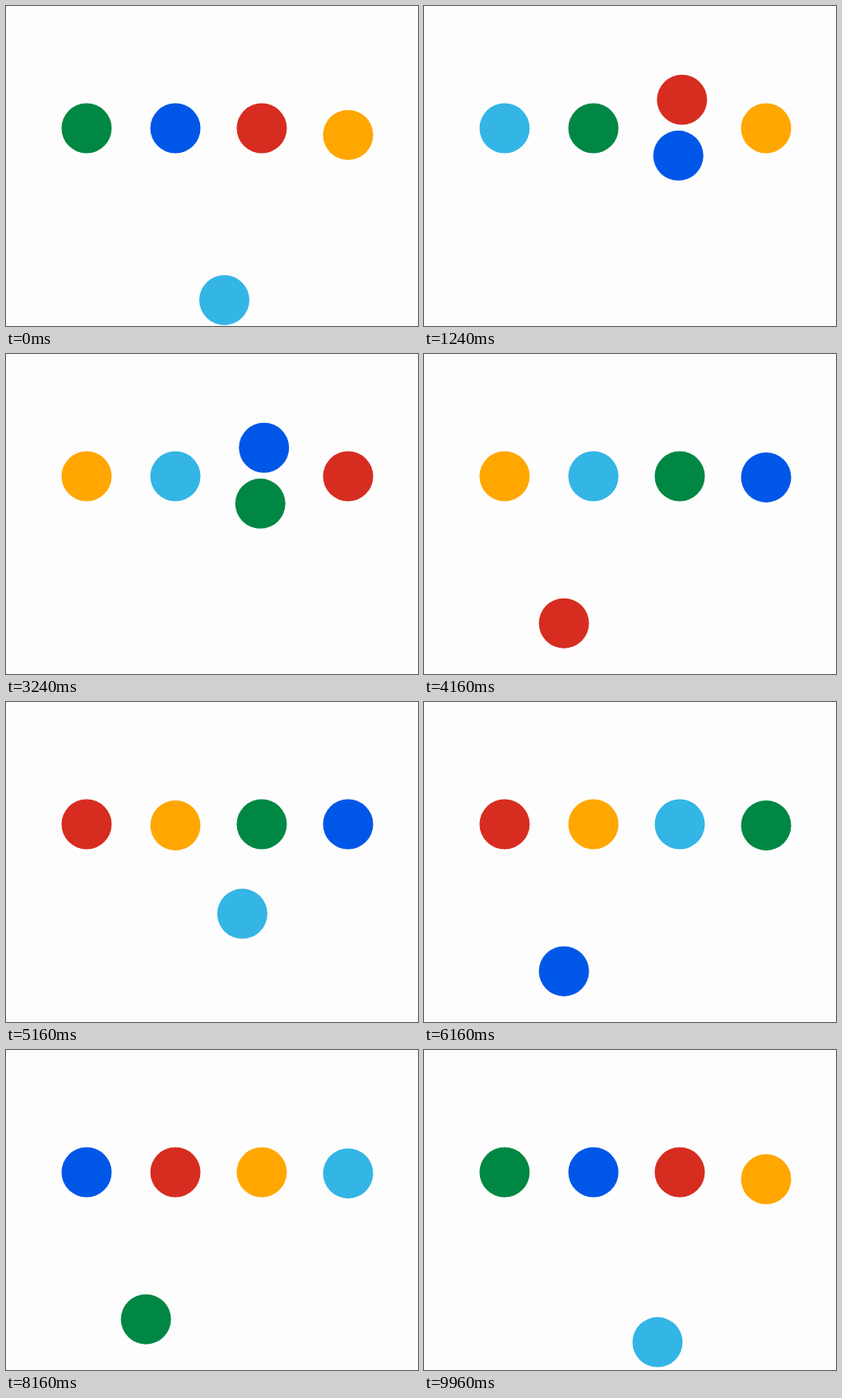
Write an HTML page with a canvas that moves like this. It is 501x390 px and loops after 10 s.

```html
<!DOCTYPE html>
<html lang="en">
<head>
<meta charset="utf-8">
<title>Bouncing balls</title>
<style>
  html, body { margin: 0; width: 100%; height: 100%; overflow: hidden; background: #fdfdfd; }
  canvas { display: block; }
</style>
</head>
<body>
<canvas id="stage" width="501" height="390"></canvas>
<script>
const ctx = document.getElementById('stage').getContext('2d');
const LOOP = 10000, STEP = 40, RADIUS = 30.5, BASE_Y = 149;
const COLORS = ['#008744', '#0057e7', '#d62d20', '#ffa700', '#33b5e5'];

const FAST = 243, SLOW = 308;     // ms between the base line and the apex
const APEX_RATE = 0.0028;         // radians per ms at the apex
const OVERSHOOT = 8.5, PEAK_AT = 205, REST_AT = 470;

// One ball's round trip: three hops along the row, then the wide sweep back.
const HOPS = [
  { from: 98,  to: 206, height: -110.2, apex: 453,  rise: FAST, fall: SLOW, bulge: 0.04 },
  { from: 206, to: 311, height: 130.6,  apex: 3017, rise: SLOW, fall: FAST, bulge: 0 },
  { from: 311, to: 416, height: -93.3,  apex: 5453, rise: FAST, fall: SLOW, bulge: 0.04 },
  { from: 416, to: 98,  height: 209.7,  apex: 8019, rise: SLOW, fall: FAST, bulge: 0.017 }
];

// Slow at the apex, faster towards the base line, a quarter turn at `half`.
function angleAt(tau, half) {
  const cubic = (Math.PI / 2 - APEX_RATE * half) / half ** 3;
  return APEX_RATE * tau + cubic * tau ** 3;
}

function settle(age) {
  if (age >= REST_AT) return 0;
  if (age < PEAK_AT) return OVERSHOOT * (1 - (1 - age / PEAK_AT) ** 4);
  const q = (age - PEAK_AT) / (REST_AT - PEAK_AT);
  return OVERSHOOT * (1 + Math.cos(Math.PI * q)) / 2;
}

function positionAt(time) {
  let x = HOPS[0].from, y = BASE_Y;
  for (const hop of HOPS) {
    const tau = time - hop.apex;
    if (tau < -hop.rise) break;
    if (tau < hop.fall) {
      const angle = angleAt(tau, tau < 0 ? hop.rise : hop.fall);
      const reach = 1 + hop.bulge * Math.sin(2 * angle) ** 2;
      x = (hop.from + hop.to) / 2 + (hop.to - hop.from) / 2 * Math.sin(angle) * reach;
      y = BASE_Y + hop.height * Math.cos(angle) * reach;
      break;
    }
    x = hop.to;
    y = BASE_Y - Math.sign(hop.height) * settle(tau - hop.fall);
  }
  return [x, y];
}

function draw(time) {
  ctx.fillStyle = '#fdfdfd';
  ctx.fillRect(0, 0, 501, 390);
  COLORS.forEach((color, i) => {
    const [x, y] = positionAt((time + i * LOOP / COLORS.length) % LOOP);
    ctx.fillStyle = color;
    ctx.beginPath();
    ctx.arc(x, y, RADIUS, 0, Math.PI * 2);
    ctx.fill();
  });
}

let start = null;
function tick(now) {
  if (start === null) start = now;
  draw(Math.floor((now - start) % LOOP / STEP) * STEP);
  requestAnimationFrame(tick);
}
draw(0);
requestAnimationFrame(tick);
</script>
</body>
</html>
```
